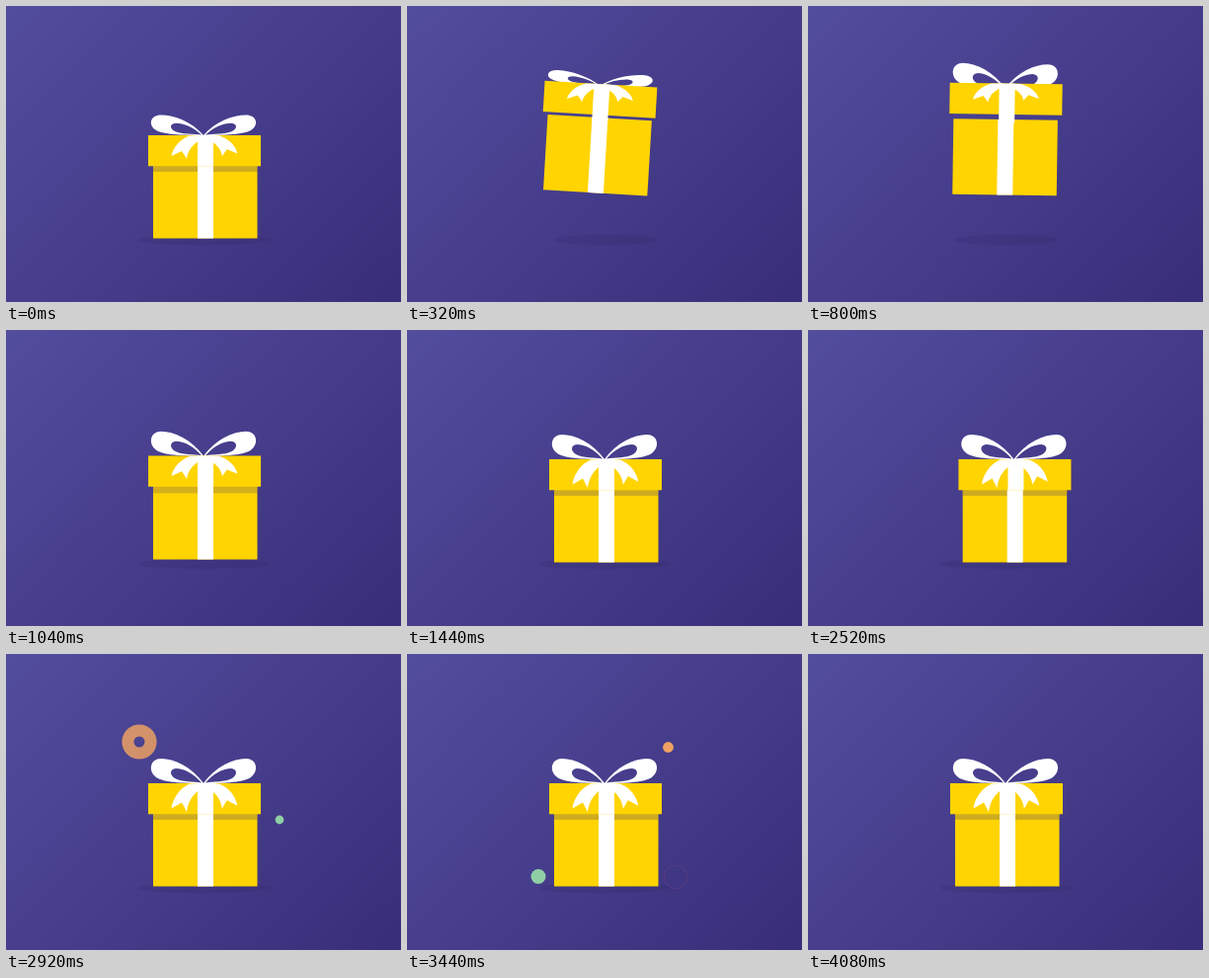
Animation, 400 px wide and 300 px high, one loop 4.28 s. Source, as an HTML page with a canvas:

```html
<!DOCTYPE html>
<html lang="en">
<head>
<meta charset="utf-8">
<title>Gift box</title>
<style>
  html, body { margin: 0; width: 100%; height: 100%; overflow: hidden; background: #463c8b; }
  canvas { display: block; width: 400px; height: 300px; }
</style>
</head>
<body>
<canvas id="stage"></canvas>
<script>
const W = 400, H = 300, LOOP = 4280, STEP = 40, LAST = 4080;
const YELLOW = '#ffd400', WHITE = '#fff';
const POP_COLORS = ['#f0a263', '#8fcfa5', '#e8607a'];
const POP_TIME = 325;
const { PI, sin, abs, min, max, sqrt } = Math;

const canvas = document.getElementById('stage');
const ctx = canvas.getContext('2d');
const dpr = window.devicePixelRatio || 1;
canvas.width = W * dpr;
canvas.height = H * dpr;

const backdrop = ctx.createLinearGradient(25, -25, 375, 325);
backdrop.addColorStop(0, '#534d9e');
backdrop.addColorStop(1, '#382d79');

const pops = [
  { x: 135, y: 89, r: 22, start: 2740 },
  { x: 277, y: 168, r: 19, start: 2880 },
  { x: 127, y: 164, r: 19, start: 3000 },
  { x: 264.5, y: 94.5, r: 19, start: 3390 },
  { x: 133, y: 225.5, r: 18, start: 3363 },
  { x: 272, y: 226, r: 12, start: 3125 }
];

const span = (t, a, b) => min(1, max(0, (t - a) / (b - a)));
const smooth = (t, a, b) => (1 - Math.cos(PI * span(t, a, b))) / 2;
const pulse = (t, a, peak, b) => smooth(t, a, peak) * (1 - smooth(t, peak, b));
const wave = (t, a, b, halves) => sin(PI * halves * span(t, a, b));

function poseAt(t) {
  const air = smooth(t, 40, 320) * (1 - smooth(t, 840, 1080));
  const settle = smooth(t, 320, 780);
  const lean = pulse(t, 40, 320, 1040);
  const squash = pulse(t, 1040, 1120, 1360);
  const rattle = wave(t, 1720, 2240, 2);
  const shake = -8.2 * wave(t, 2280, 2800, 3);
  return {
    x: shake - 8.8 * lean,
    y: -air * (46 - 2 * settle) - 3 * wave(t, 320, 800, 1),
    turn: 3.4 * lean,
    lift: air * (6 + 2.5 * settle) + 5 * abs(rattle),
    tilt: rattle / 2,
    lag: shake * 0.1 + air * settle * 0.8,
    wide: 1 + 0.37 * squash,
    tall: 1 - 0.24 * squash,
    bow: 1 - (0.18 + 0.28 * smooth(t, 40, 320)) * (1 - settle),
    sink: air * (2 + 3 * settle),
    tails: 1 - 0.18 * (1 - smooth(t, 1080, 1360)) - 0.16 * air - 0.03 * wave(t, 3880, 4080, 1),
    ground: 67 - 15 * air,
    shade: 1 - min(1, 2 * air)
  };
}

function rect(x, y, w, h, color) {
  ctx.fillStyle = color;
  ctx.fillRect(x, y, w, h);
}

function turnAbout(x, y, degrees) {
  ctx.translate(x, y);
  ctx.rotate(degrees * PI / 180);
  ctx.translate(-x, -y);
}

function scaleAbout(x, y, sx, sy) {
  ctx.translate(x, y);
  ctx.scale(sx, sy);
  ctx.translate(-x, -y);
}

function group(draw) {
  ctx.save();
  draw();
  ctx.restore();
}

const loopShape = new Path2D(
  'M200.5 131.5C188 114 170 106 157 106C146 106 144 118 151 124C158 130.500 178 130.500 200.500 131.500Z' +
  'M198 130.500C190 121 180 116 172 116C165 117 166 123 171 126C178 130 190 129 198 130.500Z');
const tailShape = new Path2D(
  'M198 131L186 131.500C176 136 169 146 167.500 156.500L178 150.500L183 160C184 150 189 142 198 136Z');

// Fills a shape and its mirror image; flip sets the height of the mirrored half.
function fillPair(shape, axis, flip) {
  ctx.fillStyle = WHITE;
  ctx.fill(shape, 'evenodd');
  scaleAbout(axis, 131, -1, flip);
  ctx.fill(shape, 'evenodd');
}

function drawLid(p) {
  ctx.translate(p.lag, -p.lift);
  turnAbout(201, 147, p.tilt);
  group(() => {
    ctx.translate(0, p.sink);
    scaleAbout(200, 131, 1, p.bow);
    fillPair(loopShape, 200, 1);
  });
  rect(144, 131, 114, 31.3, YELLOW);
  rect(194, 131, 16, 31.3 + p.lift, WHITE);
  group(() => {
    scaleAbout(201, 131, 1, p.tails);
    fillPair(tailShape, 200.9, 0.89);
  });
}

function drawGift(p) {
  ctx.translate(p.x, p.y);
  turnAbout(201.5, 197, p.turn);
  scaleAbout(200.5, 235.5, p.wide, p.tall);
  rect(149, 159, 105.5, 76.5, YELLOW);
  rect(149, 159, 105.5, 9 + p.lift * 0.7, `rgba(61,50,125,${0.25 * p.shade})`);
  rect(194, 159, 16, 76.5, WHITE);
  drawLid(p);
}

// A dot grows, then opens into a ring that thins and fades.
function drawPop(pop, color, t) {
  const k = (t - pop.start) / POP_TIME;
  if (k <= 0 || k >= 1) return;
  const r = pop.r * (1 - (1 - k) ** 2);
  const hole = span(k, 0.35, 1);
  ctx.globalAlpha = sqrt(1 - hole);
  ctx.fillStyle = color;
  ctx.beginPath();
  ctx.arc(pop.x, pop.y, r, 0, PI * 2);
  if (hole) ctx.arc(pop.x, pop.y, r * hole, 0, PI * 2, true);
  ctx.fill();
}

function render(t) {
  const p = poseAt(t);
  ctx.setTransform(dpr, 0, 0, dpr, 0, 0);
  rect(0, 0, W, H, backdrop);
  ctx.fillStyle = 'rgba(40,30,85,0.15)';
  ctx.beginPath();
  ctx.ellipse(200.7, 237, p.ground, 5.2, 0, 0, PI * 2);
  ctx.fill();
  group(() => drawGift(p));
  pops.forEach((pop, i) => group(() => drawPop(pop, POP_COLORS[i % 3], t)));
}

let begin = null;
function tick(now) {
  if (begin === null) begin = now;
  const t = (now - begin) % LOOP;
  render(min(LAST, Math.floor(t / STEP) * STEP));
  requestAnimationFrame(tick);
}
render(0);
requestAnimationFrame(tick);
</script>
</body>
</html>
```
